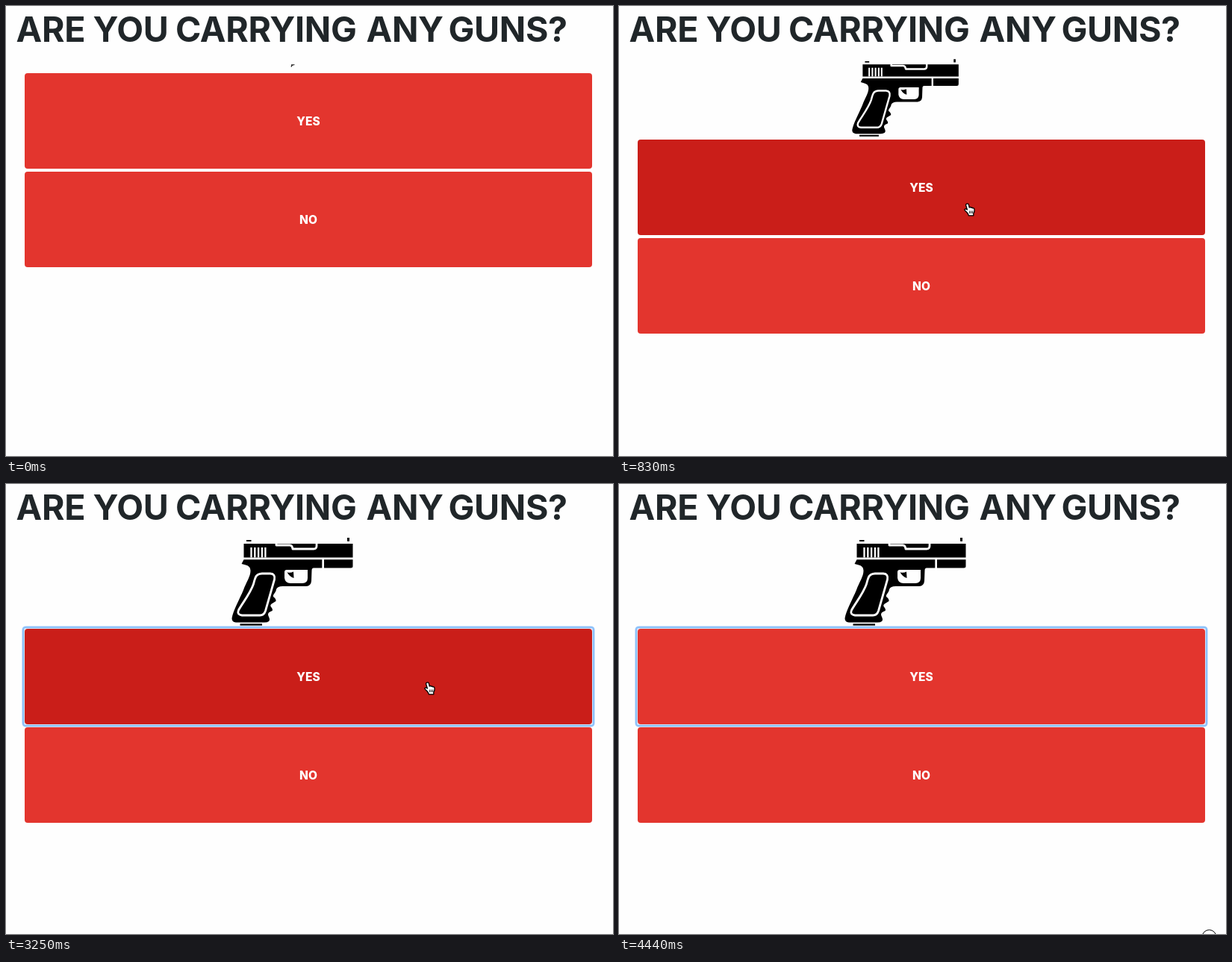
Recreate the animation shown at these times as an HTML page. Size 813 by 603 pixels, loop 4.54 s.

```html
<!DOCTYPE html>
<html lang="en">
<head>
<meta charset="utf-8">
<title>Checkpoint question</title>
<style>
html, body { margin: 0; width: 100%; height: 100%; overflow: hidden; background: #fefefe; }
svg { display: block; }
text { font-family: Inter, Roboto, "Liberation Sans", sans-serif; font-weight: 700; }
#title { font-size: 46.5px; letter-spacing: -.3px; fill: #202629; }
.button rect { fill: #e3352e; }
.button.hover rect { fill: #ca1e19; }
.button text { font-size: 15.5px; font-weight: 800; fill: #fff; text-anchor: middle; }
.cut { fill: none; stroke: #fefefe; stroke-width: 2.8; stroke-linejoin: round; }
.ring { fill: none; stroke: #80bafb; }
</style>
</head>
<body>
<svg width="813" height="603" viewBox="0 0 813 603">
  <text id="title" y="48"><tspan x="13.5">ARE</tspan><tspan x="116.5">YOU</tspan><tspan x="227">CARRYING</tspan><tspan x="482.5">ANY</tspan><tspan x="592.5">GUNS?</tspan></text>

  <g id="gun">
    <!-- slide and sights -->
    <path d="M318.5 80H464.5V98.5H318.5ZM322 75h6.5v2h-6.5ZM457 72h3v4.7h-3ZM426 101.3H464.5V110Q464.5 112.5 462 112.5H426Z"/>
    <path class="cut" d="M362 79.5V82H380Q383.5 82.3 384 87H412Q416 87 416 83V79.5"/>
    <path class="cut" d="M328.5 85v13.5m4.8-13.5v13.5m4.8-13.5v13.5m4.8-13.5v13.5m4.5-13.5v13.5" style="stroke-width:2.3"/>
    <!-- frame and grip -->
    <path d="M318.5 101.3H423.3V112.5H412Q409.5 112.7 409.5 116L409 130Q408.5 136.5 402 137H372
      Q364 136.5 362 141C361.5 146 357 148 358 151Q362 154 361.5 157C357 160 353.5 161 354.5 164Q358 168 356.5 170
      C351 172 350 174 352 178Q354 182 352 184Q350 185.5 346 185.5H308Q302.5 185 302.5 180C304 170 313 154 318 142
      C322 131 327.5 124 327.5 116Q327.5 110 321 108.5L315.5 107Z"/>
    <path fill="#fefefe" d="M376 115H404V126Q404 133 397 133H381Q374 133 373 126V118Q373 115 376 115Z"/>
    <path d="M376.5 118.2Q381 119.5 385 117.5L385.5 126Q380 124.5 376.5 118.2Z"/>
    <path class="cut" d="M343 120H354Q361 120.5 359.5 128L347.5 170Q345.5 176 340 176H316Q309 175 311.5 169C317 159 327 147 331.5 134C334 124 335 120.5 343 120Z"/>
    <path d="M313.5 187.3H343V189.6H313.5Z"/>
  </g>

  <g id="buttons">
    <g class="button" id="yes"><rect x="25" width="760" height="128" rx="4"/><text x="405" y="70">YES</text></g>
    <g class="button" id="no" transform="translate(0 132)"><rect x="25" width="760" height="128" rx="4"/><text x="405" y="70">NO</text></g>
    <g id="focus">
      <rect class="ring" x="23" y="-2" width="764" height="132" rx="4" stroke-width="4" opacity=".4"/>
      <rect class="ring" x="23" y="-2" width="764" height="132" rx="3" stroke-width="2" opacity=".85"/>
    </g>
  </g>

  <circle id="click" r="9.5" fill="none" stroke="#000"/>
  <g id="hand" stroke="#000" stroke-width="1.3" stroke-linejoin="round">
    <path fill="#fff" d="M3.6 1.2C5 .4 6.2 1.2 6.4 2.4L7.2 6Q8.4 5 9.4 6.2Q10.7 5.6 11.6 6.8Q13.7 6.4 14 8.6Q14.4 11.5 12.8 14V16.8H6.4Q5.9 14.5 3.9 12.5L1 9.6Q.4 7.8 2.8 8L4.4 9L2.6 3Q2.4 1.8 3.6 1.2Z"/>
    <path fill="none" d="M7.6 10.5v3.5m2-3.5v3.5m2-3.5v3.5" stroke-width=".9"/>
  </g>
</svg>
<script>
const LOOP = 4540, TOP = 66, FULL = 128;
const el = id => document.getElementById(id);

// Each step is a hard change that stays until the next one.
const steps = [
  { at: 0, size: .03 },
  { at: 620, size: .03, hand: [503, 264], hover: 'no' },
  { at: 740, size: .24, hand: [480, 264], hover: 'no' },
  { at: 830, size: .88, hand: [462, 264], hover: 'yes' },
  { at: 910, size: 1, hand: [459, 265], hover: 'yes' },
  { at: 1360, size: 1, hand: [459, 265], hover: 'yes', focus: true, click: [465.5, 262.5] },
  { at: 1630, size: 1, hand: [459, 265], hover: 'yes', focus: true },
  { at: 3250, size: 1, hand: [560, 265], hover: 'yes', focus: true },
  { at: 3340, size: 1, hand: [708, 291], hover: 'yes', focus: true },
  { at: 3430, size: 1, focus: true },
  { at: 4440, size: 1, focus: true, click: [790.5, 607] }
];

function show(node, visible) {
  node.style.display = visible ? '' : 'none';
}

function place(node, point) {
  show(node, point);
  if (point) node.setAttribute('transform', `translate(${point})`);
}

function draw() {
  const time = performance.now() % LOOP;
  const { size, hand, hover, focus, click } = steps.findLast(step => step.at <= time);
  // A tiny image sits on the text baseline of a 24px line.
  const line = Math.max(24, Math.round(FULL * size));
  const y = size < .1 ? TOP + 11.8 : TOP;
  el('gun').setAttribute('transform', `translate(384 ${y}) scale(${size}) translate(-384 ${-TOP})`);
  place(el('buttons'), [0, TOP + line]);
  for (const id of ['yes', 'no']) el(id).classList.toggle('hover', hover === id);
  show(el('focus'), focus);
  place(el('hand'), hand);
  place(el('click'), click);
  requestAnimationFrame(draw);
}
draw();
</script>
</body>
</html>
```
